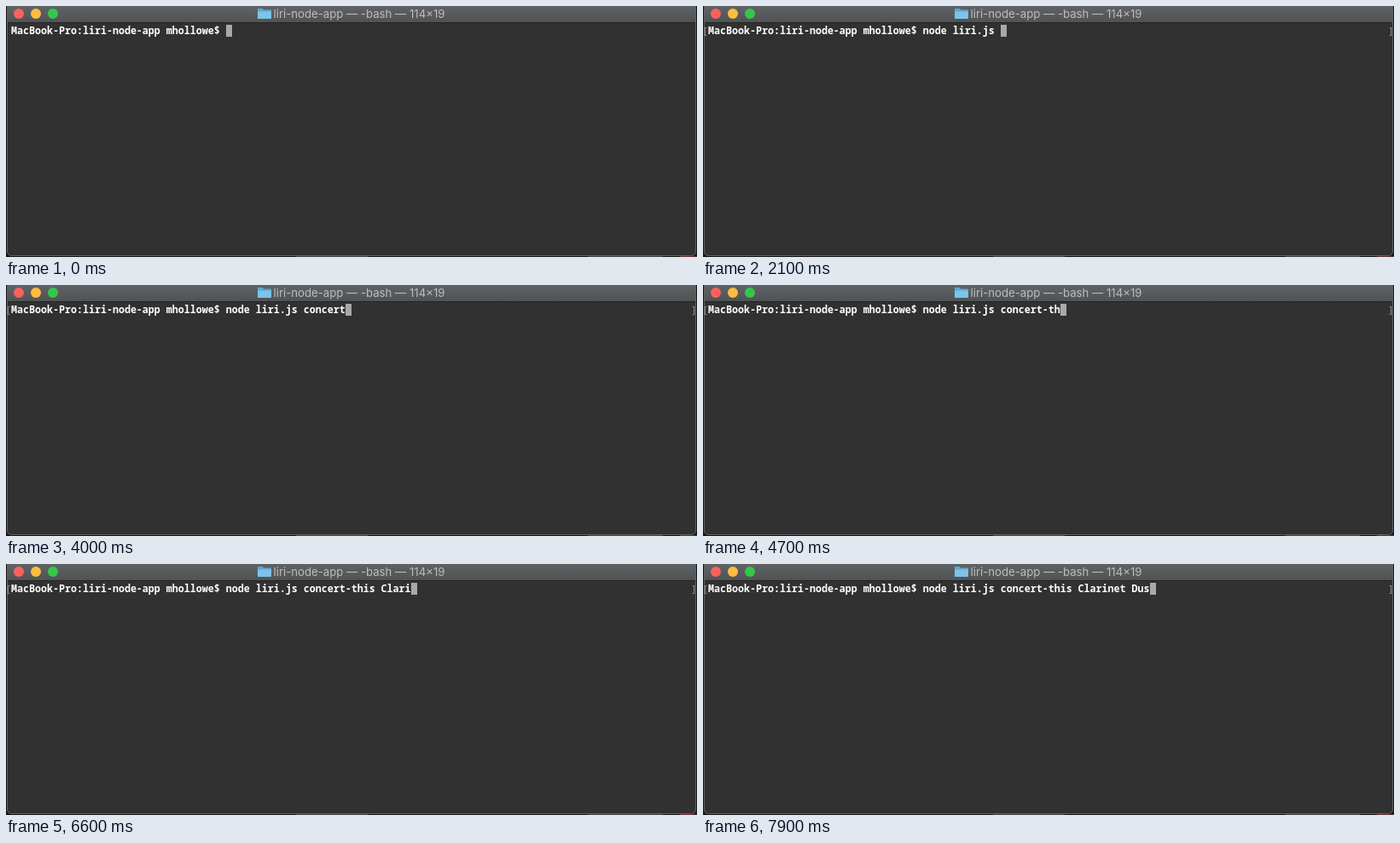
An HTML page for the animation above (8 s loop, 810 px wide and 294 px high).

```html
<!DOCTYPE html>
<html lang="en">
<head>
<meta charset="utf-8">
<title>Terminal typing</title>
<style>
  html, body { margin: 0; width: 100%; height: 100%; overflow: hidden; background: #151515; }
  svg { display: block; }
  text { white-space: pre; }
  .mono { font: 600 11.667px "Noto Sans Mono", "DejaVu Sans Mono", monospace; fill: #fff; }
  .mark { font-weight: 400; fill: #999; }
  .title { font: 400 13.2px Inter, "Open Sans", sans-serif; fill: #bbbdbf; text-anchor: middle; }
</style>
</head>
<body>
<svg width="810" height="294" viewBox="0 0 810 294">
  <defs>
    <linearGradient id="bar" x2="0" y2="1">
      <stop offset="0" stop-color="#606365"/>
      <stop offset="1" stop-color="#505356"/>
    </linearGradient>
    <clipPath id="win"><rect x="1" y="-8" width="808" height="301" rx="5"/></clipPath>
  </defs>
  <path d="M340 293.5H424M682 293.5H770" stroke="#444"/>
  <path d="M790 293.5H810" stroke="#633"/>
  <g clip-path="url(#win)">
    <rect width="810" height="294" fill="#313131"/>
    <rect width="810" height="19" fill="url(#bar)"/>
    <rect y="19" width="810" height="1" fill="#242424"/>
  </g>
  <rect x="1.5" y="-8" width="807" height="300.5" rx="5" fill="none" stroke="#626262"/>
  <circle cx="15" cy="9" r="6" fill="#fc615c"/>
  <circle cx="35" cy="9" r="6" fill="#fdbc40"/>
  <circle cx="55" cy="9" r="6" fill="#34c84a"/>
  <path d="M295 4q0-1 1-1h4.500l1.500 1.500h8q1 0 1 1V14q0 1-1 1h-14q-1 0-1-1z" fill="#5aa9d6"/>
  <path d="M295 6.500h16V14q0 1-1 1h-14q-1 0-1-1z" fill="#7cc4e8"/>
  <text class="title" x="414" y="14">liri-node-app — -bash — 114×19</text>
  <text class="mono" id="line" x="6" y="33"></text>
  <g id="marks">
    <text class="mono mark" x="-1" y="33">[</text>
    <text class="mono mark" x="803" y="33">]</text>
  </g>
  <rect id="cursor" y="22" width="7" height="14" fill="#a9a9a9"/>
</svg>
<script>
const LOOP = 8000, CELL = 7, LEFT = 6, MARKS_AT = 800;
const prompt = 'MacBook-Pro:liri-node-app mhollowe$ ';
const command = 'node liri.js concert-this Clarinet Dus';

// Time at which each character of the command appears
const keys = [
  100, 200, 300, 500, 700,
  1500, 1700, 1800, 2100, 2100, 2100, 2100, 2100,
  3100, 3200, 3300, 3400, 3700, 3800, 4000,
  4500, 4600, 4700, 4900, 5000, 5100,
  5700, 6000, 6200, 6300, 6600, 6800, 7000, 7100, 7200,
  7500, 7700, 7900
];

const [line, marks, cursor] = ['line', 'marks', 'cursor'].map(id => document.getElementById(id));
const start = performance.now();

function draw(now) {
  const t = Math.max(0, now - start) % LOOP;
  const typed = keys.filter(k => k <= t).length;
  line.textContent = prompt + command.slice(0, typed);
  cursor.setAttribute('x', LEFT + CELL * (prompt.length + typed));
  marks.setAttribute('visibility', t >= MARKS_AT ? 'visible' : 'hidden');
  requestAnimationFrame(draw);
}
draw(start);
</script>
</body>
</html>
```
